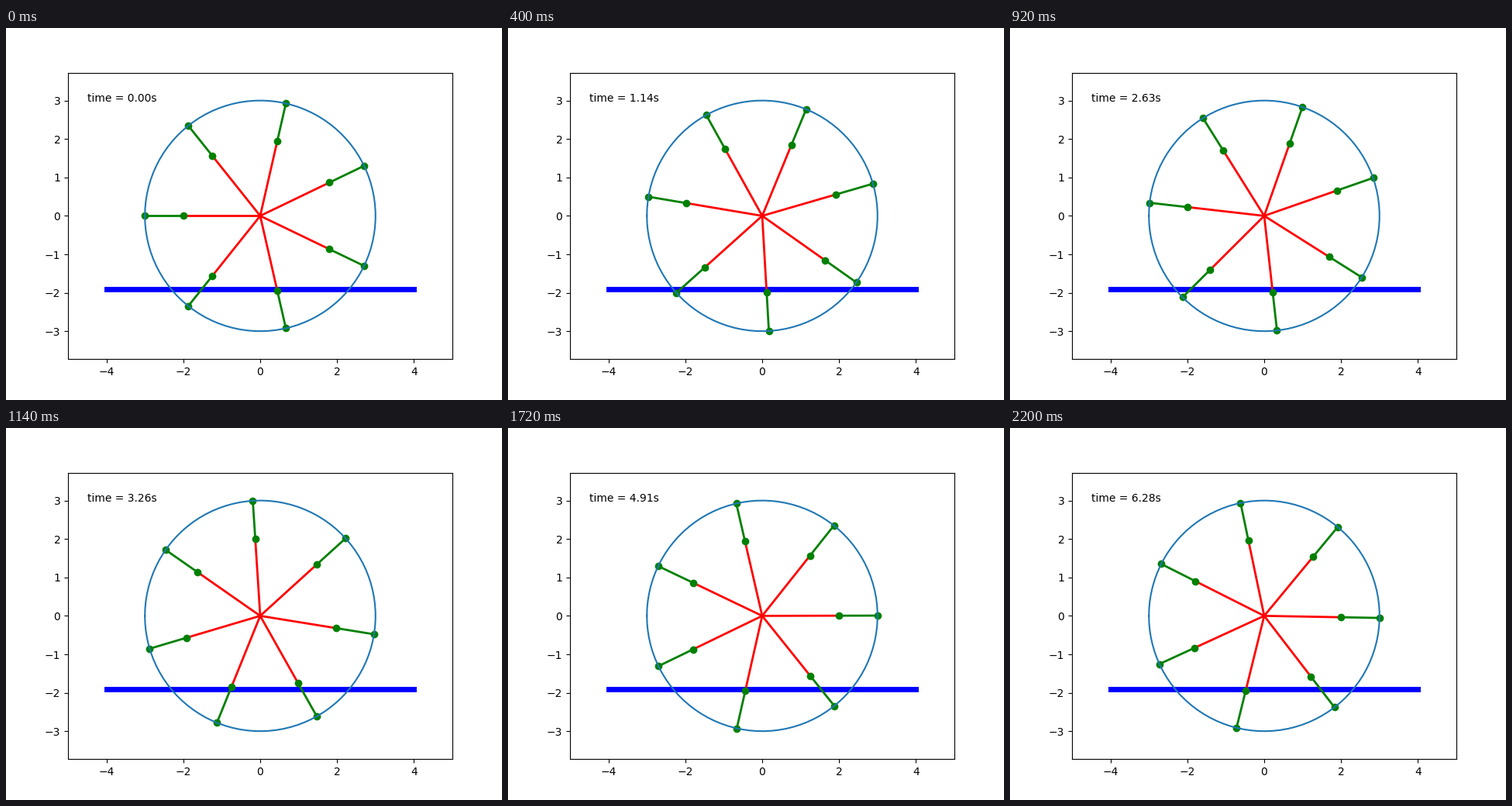
Write a matplotlib script that moves like this. It is 640 px wide and 480 px high and loops after 2220 ms.

```python
import numpy as np
import matplotlib.pyplot as plt
from matplotlib.animation import FuncAnimation

FRAMES = 111
INTERVAL = 20
SPOKES = 7
HUB, RIM = 2.0, 3.0
OMEGA = 0.64  # rad/s, counterclockwise
times = np.linspace(0, 2 * np.pi, FRAMES)

fig, ax = plt.subplots(figsize=(6.4, 4.8), dpi=100)
half_height = 5 * 369.6 / 496  # keeps both axes at the same scale
ax.set_xlim(-5, 5)
ax.set_ylim(-half_height, half_height)
ax.set_xticks(range(-4, 5, 2))
ax.set_yticks(range(-3, 4))

ax.plot([-4, 4], [-1.9, -1.9], color="blue", lw=5)
spokes = []
for _ in range(SPOKES):
    inner, = ax.plot([], [], "-", color="red", lw=2)
    outer, = ax.plot([], [], "o-", color="green", lw=2)
    spokes.append((inner, outer))

theta = np.linspace(-np.pi, np.pi, 100)
ax.plot(RIM * np.cos(theta), RIM * np.sin(theta), color="C0")
label = ax.text(0.05, 0.9, "", transform=ax.transAxes)


def update(i):
    t = times[i]
    for k, (inner, outer) in enumerate(spokes):
        angle = np.pi + 2 * np.pi * k / SPOKES + OMEGA * t
        c, s = np.cos(angle), np.sin(angle)
        inner.set_data([0, HUB * c], [0, HUB * s])
        outer.set_data([HUB * c, RIM * c], [HUB * s, RIM * s])
    label.set_text(f"time = {t:.2f}s")
    return [line for pair in spokes for line in pair] + [label]


anim = FuncAnimation(fig, update, frames=FRAMES, interval=INTERVAL,
                     repeat=True, repeat_delay=0, blit=False)
plt.show()
```
